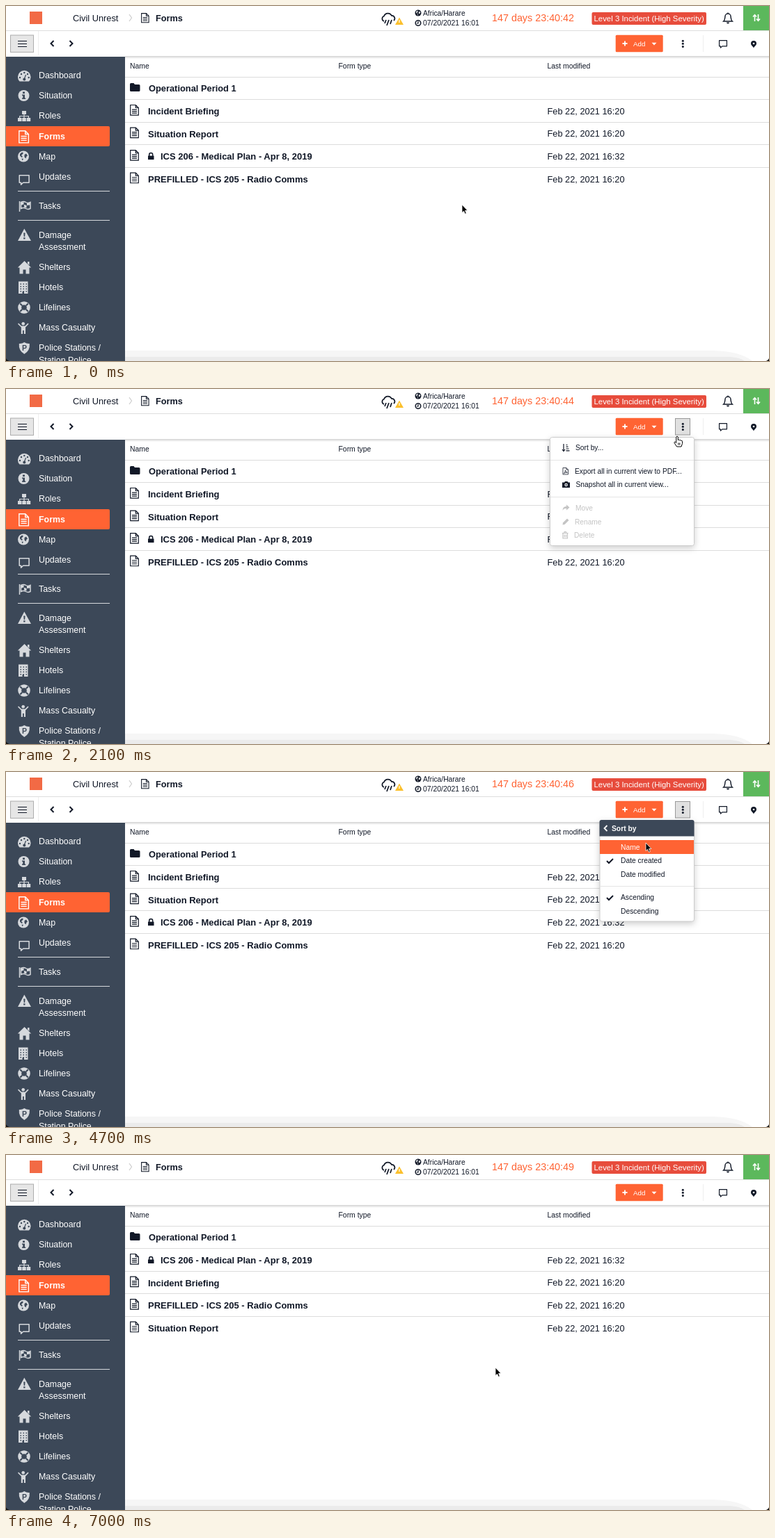
These frames come from a looping animation (1096 px wide and 511 px high, 7.8 s). An HTML page:

```html
<!DOCTYPE html>
<html lang="en">
<head>
<meta charset="utf-8">
<title>Forms</title>
<style>
html, body { margin: 0; height: 100%; overflow: hidden; background: #fff; }
svg { display: block; width: 1096px; height: 511px; font-family: "Liberation Sans", Arial, sans-serif; }
.menu { filter: drop-shadow(0 3px 5px rgba(0,0,0,.2)); }
.line { fill: none; stroke: currentColor; stroke-width: 1.2; }
</style>
</head>
<body>
<svg id="stage" viewBox="0 0 1096 511" fill="#111827" color="#111827"></svg>
<script>
const ORANGE = '#ff6333', NAVY = '#3c4858', PALE = '#d6d9dd';
const LOOP = 7800, STEP = 100;
const stage = document.getElementById('stage');

// cy is the middle of the capitals
const text = (x, cy, s, size = 12.8, attrs = '') =>
  `<text x="${x}" y="${cy + size * .36}" font-size="${size}" ${attrs}>${s}</text>`;
const bold = (x, cy, s, size, attrs = '') => text(x, cy, s, size, 'font-weight="700" ' + attrs);
const rect = (x, y, w, h, fill, attrs = '') =>
  `<rect x="${x}" y="${y}" width="${w}" height="${h}" fill="${fill}" ${attrs}/>`;
const path = (d, attrs = '') => `<path d="${d}" ${attrs}/>`;
const line = (d, attrs = '') => path(d, 'class="line" ' + attrs);
const dot = (x, y, r, attrs = '') => `<circle cx="${x}" cy="${y}" r="${r}" ${attrs}/>`;
const group = (x, y, s, body, attrs = '') =>
  `<g transform="translate(${x} ${y}) scale(${s})" ${attrs}>${body}</g>`;

const page = 'M.7.7H8.3L12.3 4.7V15.3H.7ZM8.3.7V4.7H12.3';
const doc = (x, y, s = 1) => group(x, y, s, line(page + 'M3 7.3H10M3 9.8H10M3 12.3H10'));
const pdf = (x, y, s) => group(x, y, s, line(page + 'M3 13Q6 10 6 6Q7 10.500 10.500 11Q6 10.500 3 13'));
const globe = (x, y, r, land) => group(x, y, r / 8, dot(0, 0, 8) +
  path('M-5-3.500-2-6 0-5-1.500-3-3-1.500-1 .5-2.500 1.500-5-1ZM1.500-2.500 4-4 6-1 4.500 0 3.500 3 1.500 1ZM-2.500 3 0 3.500-1.500 6Z', `fill="${land}"`));
const chat = (x, y, s, w) => group(x, y, s,
  line('M1 .7H14.3V11H6L3 14V11H.7V.7Z', `style="stroke-width:${w}" stroke-linejoin="round"`));
const check = y => line(`M863 ${y}l3 3 6-6`, 'style="stroke-width:2"');

function header() {
  return rect(0, 0, 1096, 72, '#fff') +
    rect(171, 72, 925, 4, 'url(#fade)') +
    rect(0, 35, 1096, 1, '#dedede') +
    rect(34, 8, 18, 18, '#f26a45') +
    text(96, 17, 'Civil Unrest') +
    line('M177 12l3.5 5-3.5 5', 'color="#ccc"') +
    doc(194, 10, .9) + bold(215, 17, 'Forms', 12.7) +
    line('M543 22a4 4 0 0 1 0-7.5 6 6 0 0 1 11-.5 4 4 0 0 1 3 7M546 20l-2 5M550 20l-3 8M554 20l-2 6', 'style="stroke-width:1.7"') +
    path('M565 16.5l6 10.5h-12Z', 'fill="#fbc02d"') + rect(564.4, 20, 1.2, 4, '#fff') +
    globe(592, 10, 4.5, '#fff') + text(599, 10.3, 'Africa/Harare', 10.3) +
    dot(592, 24.5, 3.8, 'class="line" style="stroke-width:1.5"') + line('M592 22v3h-2.2') +
    text(599, 24.5, '07/20/2021 16:01', 10.4) +
    `<text id="timer" x="698" y="22.2" font-size="14.35" fill="${ORANGE}"></text>` +
    rect(841.5, 9, 164.5, 18, '#e74c3c', 'rx="2"') +
    text(844.5, 18.3, 'Level 3 Incident (High Severity)', 11.4, 'fill="#fff"') +
    line('M1030.7 22C1033 20 1032.500 17 1033 15a4 4 0 0 1 8 0C1041.500 17 1041 20 1043.300 22ZM1037 9.500V11', 'style="stroke-width:1.4"') +
    path('M1035 23.500h4a2 2 0 0 1-4 0Z') +
    rect(1059, 0, 37, 35, '#5cb85c') +
    line('M1075.500 22V13M1073 15.500l2.500-2.700 2.500 2.700M1080.500 12V21M1078 18.500l2.500 2.700 2.500-2.700', 'color="#fff" style="stroke-width:1.6"') +
    rect(6.5, 42, 33, 24.5, '#e6e6e6', 'stroke="#adadad"') +
    line('M17 50.500h13M17 54.500h13M17 58.500h13') +
    rect(46, 36, 1, 36, '#eee') + rect(1001, 42, 1, 24, '#eee') +
    line('M68.500 50l-4 4 4 4M91.500 50l4 4-4 4', 'style="stroke-width:2"') +
    rect(875.7, 41.7, 68, 24.5, ORANGE, 'rx="1.5"') +
    line('M885.500 54h7M889 50.500v7', 'color="#fff" style="stroke-width:1.8"') +
    text(901, 54.3, 'Add', 9.8, 'fill="#fff"') +
    path('M927.500 52.800h7l-3.500 3.700Z', 'fill="#fff"') +
    rect(961.5, 42.5, 21, 23.5, '#ccc', 'id="more" stroke="#999"') +
    [50.2, 54.3, 58.4].map(y => dot(972.3, y, 1.5)).join('') +
    chat(1024, 49, .8, 1.5) +
    path('M1074 60.500c-1-2.500-4-4-4-6.500a4 4 0 0 1 8 0c0 2.500-3 4-4 6.500Z') + dot(1074, 54, 1.3, 'fill="#fff"');
}

function sidebar() {
  const labels = [[100, 'Dashboard'], [129, 'Situation'], [158, 'Roles'], [216.5, 'Map'], [245.8, 'Updates'],
    [287.5, 'Tasks'], [329.5, 'Damage'], [346.7, 'Assessment'], [376, 'Shelters'], [405, 'Hotels'],
    [434, 'Lifelines'], [463, 'Mass Casualty'], [492, 'Police Stations /'], [509.3, 'Station Police']];
  let windows = '';
  for (let i = 0; i < 12; i++) windows += rect(20.5 + i % 3 * 4, 399.5 + (i / 3 | 0) * 3.5, 1.5, 1.5, NAVY);
  const icons =
    path('M19.500 108.500a9.300 9.300 0 1 1 13.500 0Z') +
    [[20, 103], [22, 98], [26.3, 96], [31, 98], [32.700, 103]].map(p => dot(p[0], p[1], 1.2, `fill="${NAVY}"`)).join('') +
    line('M26.300 105l2.200-6', `color="${NAVY}"`) + dot(26.3, 105.5, 2, `fill="${NAVY}"`) +
    dot(25.5, 129, 8) + path('M24 123.500h3v2.500h-3ZM23 127.500h4v5h1.200v1.500H23v-1.500h1.200v-3.500H23Z', `fill="${NAVY}"`) +
    path('M23 151h6v5h-6ZM17 161h5.500v5H17ZM23.300 161h5.500v5h-5.500ZM29.700 161h5.500v5h-5.500Z') +
    line('M26 156v5M19.700 161v-2.500h12.700v2.500') +
    globe(25, 216.5, 8, NAVY) + chat(18.5, 243, 1.02, 1.5) +
    line('M19.500 281v15M21.500 282.500q4-2 7 0t6.500 0v9q-3.500 2-6.500 0t-7 0Z', 'style="stroke-width:1.5"') +
    path('M22 283l3.500-1v3.500l-3.500 1ZM26 286l3.500 1v3.500l-3.500-1ZM30 283.500l4.500 0v3l-4.500.5Z') +
    path('M26.300 320.500l9.700 17.500H17Z') + path('M25.200 326.500h2.400l-.5 5.500h-1.400ZM25.200 333.300h2.300v2.200h-2.300Z', `fill="${NAVY}"`) +
    path('M26.500 367l9.700 9.500h-2.700v9h-5v-6h-4v6h-5v-9h-2.700ZM31 368h2.500v5l-2.500-2Z') +
    path('M18 396.500h13.500V414H18Z') + windows + rect(23.5, 411, 2.5, 3, NAVY) +
    dot(26, 434, 6.3, 'class="line" style="stroke-width:5"') +
    line('M20.200 428.200l3 3M31.800 428.200l-3 3M20.200 439.800l3-3M31.800 439.800l-3-3', `color="${NAVY}" style="stroke-width:2"`) +
    dot(24.7, 457.2, 2.3) + path('M18 456.500l4 4h5.500l4-4 1 1.300-4.500 4.700v9.500h-2.200v-5h-1.800v5h-2.200v-9.500l-4.800-4.700Z') +
    path('M26.300 484q3.500 2.500 7.500 2 1 10-7.500 15-8.500-5-7.500-15 4 .5 7.500-2Z') +
    bold(22.9, 492, 'P', 10.5, `fill="${NAVY}"`);
  return rect(0, 73, 171, 438, NAVY) +
    path('M0 173h147a2 2 0 0 1 2 2v25a2 2 0 0 1-2 2H0Z', `fill="${ORANGE}"`) +
    `<g fill="#fff" color="#fff">${doc(18, 179, 1.17)}${bold(47, 187.5, 'Forms', 12.4)}` +
    labels.map(([y, s]) => text(47, y, s, 12.4)).join('') + '</g>' +
    rect(17, 266, 132, 1, PALE) + rect(17, 308, 132, 1, PALE) +
    `<g fill="${PALE}" color="${PALE}">${icons}</g>`;
}

const forms = [['Incident Briefing', '20'], ['Situation Report', '20'],
  ['ICS 206 - Medical Plan - Apr 8, 2019', '32', true], ['PREFILLED - ICS 205 - Radio Comms', '20']];
const byName = [...forms].sort((a, b) => a[0].toLowerCase() < b[0].toLowerCase() ? -1 : 1);

function list() {
  const lock = path('M204 215.500h8.500v5.500H204Z') + line('M205.700 216v-2a2.500 2.500 0 0 1 5 0v2', 'style="stroke-width:1.5"');
  return [[178, 'Name'], [477.5, 'Form type'], [777.5, 'Last modified']].map(([x, s]) => text(x, 86.5, s, 10.4)).join('') +
    [0, 1, 2, 3, 4].map(i => rect(170, Math.round(101.6 + i * 32.6), 926, 1, '#dcdcdc')).join('') +
    path('M178 112.500q0-1.500 1.500-1.500h4l1.500 2h6q1.500 0 1.500 1.500v7q0 1.500-1.500 1.500h-11.500q-1.500 0-1.500-1.500Z') +
    bold(205, 118.7, 'Operational Period 1', 12.85) +
    forms.map(([s, min, locked]) => '<g class="row">' + doc(178, 141.8) +
      (locked ? `<g transform="translate(0 -65)">${lock}</g>` : '') +
      bold(locked ? 222 : 204, 151.3, s, 13) + text(777.5, 151.3, 'Feb 22, 2021 16:' + min) + '</g>').join('');
}

function menus() {
  const off = '#c4c4c4';
  const panel = (x, w, h) => rect(x, 69.5, w, h, '#fff', 'rx="3" stroke="#ccc" class="menu"');
  const main = panel(781.5, 207, 156) + rect(782, 102, 206, 1, '#e5e5e5') + rect(782, 155, 206, 1, '#e5e5e5') +
    rect(782, 75, 206, 20, ORANGE, 'id="sortHover"') +
    `<g id="sortItem">${line('M801 79v10M799 87l2 2.500 2-2.500M804.500 80.500h2M804.500 83.200h3M804.500 86h4M804.500 88.800h5')}${text(818, 84.7, 'Sort by...', 10.25)}</g>` +
    pdf(799.5, 113, .65) + text(817, 118.2, 'Export all in current view to PDF...', 10.25) +
    path('M799 134.500h3l1-1.500h3.500l1 1.500h2.500v7.500h-11Z') + dot(804.6, 138, 2.2, 'fill="#fff"') + dot(804.6, 138, 1.1) +
    text(818.5, 137.7, 'Snapshot all in current view...', 10.25) +
    `<g fill="${off}" color="${off}">` +
    path('M799.500 175q0-6 5.500-6v-2.500l4.500 4-4.500 4V172q-4-.5-5.500 3Z') + text(818, 171.2, 'Move', 10.2) +
    path('M799.500 195.500l.5-3 6-6 2.500 2.500-6 6Z') + text(817, 191, 'Rename', 10.2) +
    line('M799 207.500h8.500M802 207v-1.500h2.500v1.500M800 208v7h6.500v-7M802.200 209.500v4M804.500 209.500v4') + text(816, 210.5, 'Delete', 10.2) + '</g>';
  const sort = panel(853, 135.5, 145.5) +
    path('M852.500 92.500v-20.500a3 3 0 0 1 3-3h130a3 3 0 0 1 3 3v20.500Z', `fill="${NAVY}"`) +
    line('M863.500 77l-4 4 4 4', 'color="#fff" style="stroke-width:1.8"') + bold(870, 81.2, 'Sort by', 10.3, 'fill="#fff"') +
    rect(853, 98, 135, 20, ORANGE, 'id="nameHover"') + rect(853, 164, 135, 1, '#e5e5e5') +
    `<g id="nameItem">${text(883, 107.9, 'Name', 10.3)}</g>` +
    [[127.6, 'Date created'], [147.3, 'Date modified'], [180.7, 'Ascending'], [200.4, 'Descending']]
      .map(([y, s]) => text(883, y, s, 10.3)).join('') + check(128) + check(181);
  return `<g id="mainMenu">${main}</g><g id="sortMenu">${sort}</g>`;
}

stage.innerHTML = `<defs><linearGradient id="fade" x2="0" y2="1"><stop stop-opacity=".18"/><stop offset="1" stop-opacity="0"/></linearGradient></defs>` +
  path('M170 496H1015Q1055 497 1072 511H170Z', 'fill="#f6f6f6"') +
  path('M170 505H1040Q1055 506 1061 511H170Z', 'fill="#ebebeb"') +
  list() + sidebar() + header() +
  path('M0 507q1 3 5 4H0ZM1096 507q-1 3-4 4h4Z', 'fill="#111"') + menus() +
  '<g id="cursor">' +
  path('M0 0V11.500L2.600 9.300 4.400 13.300 6.300 12.500 4.600 8.500H8Z', 'id="arrow" fill="#000" stroke="#fff" stroke-width=".8"') +
  path('M-1.300 1q1.300-2 2.600 0V5.500q1.500-1 2.300.3 1.500-.8 2.200.5 1.600-.5 1.700 1V10.500l-1.500 4.500H-.5L-4 9.500q-.3-2 1.500-1.300l1.200 1.300ZM1.800 9.500v3M3.800 9.500v3', 'id="hand" fill="#fff" stroke="#000"') + '</g>';

const $ = id => document.getElementById(id);
const show = (id, on) => $(id).setAttribute('visibility', on ? 'visible' : 'hidden');
const tint = (id, on) => ['fill', 'color'].forEach(a => $(id).setAttribute(a, on ? '#fff' : '#111827'));
const rows = [...document.querySelectorAll('.row')];

// time, x, y of the pointer tip
const route = [[0, 655, 286], [600, 655, 286], [1400, 976, 58], [1700, 976, 58], [2100, 964, 68], [2500, 948, 80],
  [2900, 948, 80], [3700, 935, 91], [3800, 935, 91], [4600, 919, 102], [5100, 919, 102], [5400, 702, 306],
  [5600, 702, 306], [5700, 703, 306], [LOOP, 703, 306]];
const ticks = [1000, 2000, 3000, 4000, 5000, 5900, 7000];
const OPEN = 1600, SUBMENU = 2600, SORTED = 4800;

function pointer(t) {
  const i = route.findIndex(p => p[0] > t), [t0, x0, y0] = route[i - 1], [t1, x1, y1] = route[i];
  const u = (t - t0) / (t1 - t0), e = u * u * (3 - 2 * u);
  return [x0 + (x1 - x0) * e, y0 + (y1 - y0) * e];
}

function draw(now) {
  const t = Math.floor(now % LOOP / STEP) * STEP;
  const [x, y] = pointer(t);
  const inMain = t >= OPEN && t < SUBMENU, inSort = t >= SUBMENU && t < SORTED;
  const onSort = inMain && y >= 75, onName = inSort && y >= 98;
  const hand = t >= 1400 && t < SUBMENU;

  $('timer').textContent = '147 days 23:40:' + (42 + ticks.filter(s => s <= t).length);
  $('cursor').setAttribute('transform', `translate(${x} ${y})`);
  show('arrow', !hand);
  show('hand', hand);
  show('more', t >= 1400 && t < SORTED);
  $('more').setAttribute('fill', t < OPEN ? '#cacaca' : '#e0e0e0');
  show('mainMenu', inMain);
  show('sortMenu', inSort);
  show('sortHover', onSort);
  show('nameHover', onName);
  tint('sortItem', onSort);
  tint('nameItem', onName);
  const order = t < SORTED ? forms : byName;
  rows.forEach((row, i) => row.setAttribute('transform', `translate(0 ${order.indexOf(forms[i]) * 32.55})`));
  requestAnimationFrame(draw);
}
requestAnimationFrame(draw);
</script>
</body>
</html>
```
